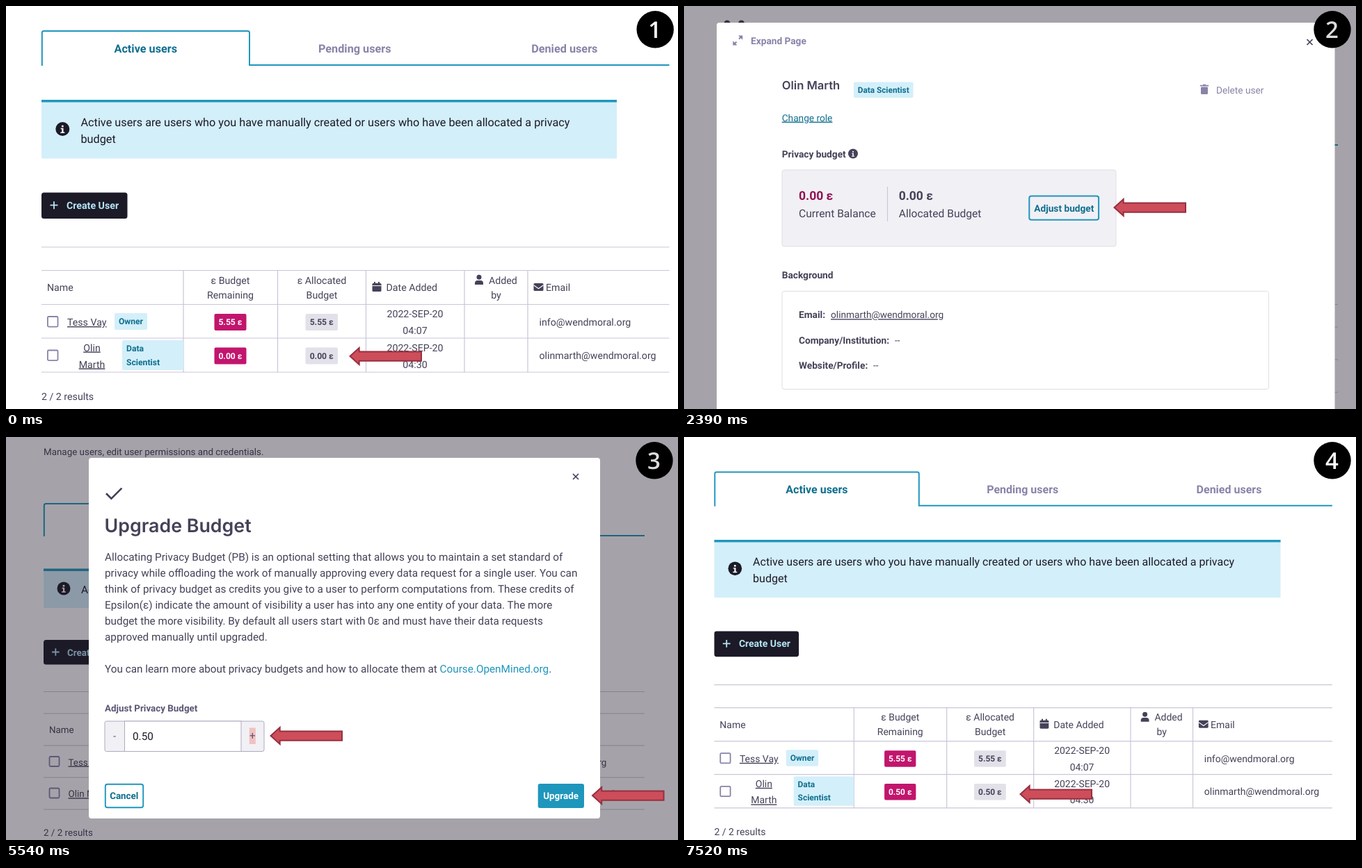
An HTML page for the animation above (8 s loop, 966x580 px).

```html
<!DOCTYPE html>
<html lang="en">
<head>
<meta charset="utf-8">
<title>Adjusting a privacy budget</title>
<style>
  html, body { margin: 0; width: 100%; height: 100%; overflow: hidden; background: #fff; }
  svg { display: block; width: 966px; height: 580px; }
  text { font-family: Roboto, sans-serif; text-rendering: geometricPrecision; white-space: pre; }
  .b { font-weight: 700; }
  .u { text-decoration: underline; }
  .title { font-family: Inter, sans-serif; font-weight: 600; }
  .num { font-family: "Open Sans", sans-serif; font-weight: 600; }
  .scene { opacity: 0; animation: 8s step-end infinite; }
  #list { animation-name: list; }
  #profile { animation-name: profile; }
  #upgrade { animation-name: upgrade; }
  #result { animation-name: result; }
  @keyframes list { 0% { opacity: 1 } 6.25%, 100% { opacity: 0 } }
  @keyframes profile { 0% { opacity: 0 } 6.25% { opacity: 1 } 45.625%, 100% { opacity: 0 } }
  @keyframes upgrade { 0% { opacity: 0 } 45.625% { opacity: 1 } 85%, 100% { opacity: 0 } }
  @keyframes result { 0% { opacity: 0 } 85%, 100% { opacity: 1 } }
</style>
</head>
<body>
<svg id="stage" viewBox="0 0 966 580">
  <g id="list" class="scene"></g>
  <g id="profile" class="scene"></g>
  <g id="upgrade" class="scene"></g>
  <g id="result" class="scene"></g>
</svg>
<script>
const INK = '#464158', DARK = '#1c1a27', MUTED = '#8883a8', LINE = '#c9c6d8',
      TEAL = '#1f96bc', DEEP = '#0f6f8e', PALE = '#d3effa', PINK = '#c2156d', GREY = '#e2e1e9';
const OWNER = 'Tess Vay', FIRST = 'Olin', LAST = 'Marth', USER = `${FIRST} ${LAST}`;
const OWNER_MAIL = 'info@wendmoral.org', USER_MAIL = 'olinmarth@wendmoral.org';
const NOTE = 'Active users are users who you have manually created or users who have been allocated a privacy';

const text = (x, y, str, size, fill = INK, cls = '', anchor = 'start') =>
  `<text x="${x}" y="${y}" font-size="${size}" fill="${fill}" class="${cls}" text-anchor="${anchor}">${str}</text>`;
const mid = (x, y, str, size, fill, cls) => text(x, y, str, size, fill, cls, 'middle');
const rect = (x, y, w, h, fill, r = 0, stroke = 'none', sw = 1) =>
  `<rect x="${x}" y="${y}" width="${w}" height="${h}" rx="${r}" fill="${fill}" stroke="${stroke}" stroke-width="${sw}"/>`;
const path = (d, stroke, sw = 1, fill = 'none') =>
  `<path d="${d}" fill="${fill}" stroke="${stroke}" stroke-width="${sw}"/>`;
const dot = (x, y, r, fill) => `<circle cx="${x}" cy="${y}" r="${r}" fill="${fill}"/>`;
const at = (x, y, k, body) => `<g transform="translate(${x} ${y}) scale(${k})">${body}</g>`;

const info = (x, y, r, ink = DARK) => at(x, y, r / 10,
  dot(0, 0, 10, ink) + dot(0, -4, 1.5, '#fff') +
  path('M-2.6 -1.2H1.2V4.6H3V6H-3V4.6H-1V.3H-2.6Z', 'none', 0, '#fff'));
const plus = (x, y, r, color) => path(`M${x - r} ${y}h${2 * r}M${x} ${y - r}v${2 * r}`, color, 1.8);
const cross = (x, y) => path(`M${x - 4} ${y - 4}l8 8m0 -8l-8 8`, INK, 1.7);
const check = (x, y, s) => rect(x, y, s, s, '#fff', 1.5, MUTED, 1.8);
const badge = (x, n, ink = '#fff') => dot(x, 33.8, 26.7, '#000') + mid(x - .5, 45.5, n, 33, ink, 'num');
const arrow = (x, y) => path(`M${x + 1} ${y}l13.2 -12v5.4h89.3v13.2h-89.3v5.4z`, '#96303f', 2, '#cd4d5b');
const chip = (x, y, w, h, fill, str, color) =>
  rect(x, y, w, h, fill, 2) + mid(x + w / 2, y + h / 2 + 4.2, str, 12.15, color, 'b');

const calendar = rect(526.5, 399, 13, 12, INK, 1.5) +
  path('M530 397v3M536 397v3', INK, 2) + path('M526.5 402.6h13', '#fff', 1);
const person = dot(680, 390.3, 3.5, INK) + path('M674 401v-2q0 -4 4 -4h4q4 0 4 4v2z', 'none', 0, INK);
const envelope = rect(758.5, 399, 14, 11, INK, 1.5) + path('M758.5 401.8l7 5l7 -5', '#fff', 1.1);

// User list; only the second user's budget differs between visits
function page(budget) {
  const S = 14.2, B = 16.25;
  const row = (y, amount) =>
    chip(299.5, y - 12, 46, 24, PINK, amount, '#fff') +
    chip(430.5, y - 12, 46.5, 24, GREY, amount, INK) +
    check(59.9, y - 8, 14.6) + mid(588, y - 7, '2022-SEP-20', S);
  return [
    path('M51.8 86V38.5Q51.8 36 54.3 36H347.5Q350 36 350 38.5V85H953.5', TEAL, 2),
    mid(200.8, 67, 'Active users', B, DEEP, 'b'),
    mid(501.3, 67, 'Pending users', B, MUTED, 'b'),
    mid(802.8, 67, 'Denied users', B, MUTED, 'b'),
    rect(51, 135, 827, 84.5, PALE), rect(51, 135, 827, 3.5, TEAL),
    info(81.3, 177, 10), text(107.5, 173, NOTE, B, DARK), text(107.5, 197, 'budget', B, DARK),
    rect(51, 268.5, 123.5, 37.5, DARK, 3.5), plus(69, 286.7, 5.5, '#b5e4f5'),
    text(87, 291.8, 'Create User', S, '#b5e4f5', 'b'),
    path('M51 347H953.5M51 380.5H953.5M51 429.5H953.5M51 478H953.5M51 527H953.5', LINE, 1.2),
    path([255, 390.5, 517.5, 659, 750].map(x => `M${x} 380.5V527`).join(''), LINE, 1.2),
    text(59, 410, 'Name', S),
    mid(322.5, 399.5, 'ε Budget', S), mid(322.5, 420.5, 'Remaining', S),
    mid(454, 399.5, 'ε Allocated', S), mid(454, 420.5, 'Budget', S),
    calendar, text(546.5, 410, 'Date Added', S),
    person, text(694, 399.5, 'Added', S), mid(704.5, 420.5, 'by', S),
    envelope, text(776, 410, 'Email', S),
    row(455, '5.55 ε'), mid(588, 472, '04:07', S),
    text(88, 460, OWNER, S, INK, 'u'), chip(156, 442, 47, 24, PALE, 'Owner', DEEP),
    text(766.5, 460, OWNER_MAIL, S),
    row(503.5, budget), mid(588, 520.5, '04:30', S),
    mid(123.5, 496.5, FIRST, S, INK, 'u'), mid(123.5, 520.5, LAST, S, INK, 'u'),
    rect(167, 481, 88, 43, PALE, 2),
    text(173, 497, 'Data', 12.15, DEEP, 'b'), text(173, 516.5, 'Scientist', 12.15, DEEP, 'b'),
    text(766.5, 508, USER_MAIL, S),
    text(51, 567, '2 / 2 results', S)
  ].join('');
}

const shade = rect(0, 0, 966, 580, 'rgba(30,27,40,.4)');

function profile() {
  const S = 13.7, B = 15.64;
  const field = (y, name, x, value, cls) =>
    text(165, y, name, S, INK, 'b') + text(x, y, value, S, INK, cls);
  return [
    rect(0, 0, 966, 580, '#fff'), dot(62, 25, 4.5, INK), dot(82.5, 25, 4.5, INK),
    path('M930 200h10', TEAL, 2), path('M930 429.5h10M930 462h10M930 509h10M930 556h10', LINE, 1.2),
    shade, rect(47, 24, 888.5, 570, '#fff', 4),
    path('M79 47.5l4 -4M75.5 51.5l-4 4', MUTED, 2),
    path('M78 42.5h6.2v6.2zM70.3 50.3v6.2h6.2z', 'none', 0, MUTED),
    text(96, 54.5, 'Expand Page', S, MUTED, 'b'), cross(899.5, 52),
    text(140.7, 119.7, USER, 16.6, INK, 'title'),
    rect(244, 109.5, 85.5, 22.5, PALE, 2), mid(286.7, 125, 'Data Scientist', 11.8, DEEP, 'b'),
    rect(743, 116.5, 10, 10.5, MUTED, 1.2), path('M741.8 114.7h12.4M746 113.6h4', MUTED, 1.8),
    text(765, 125.6, 'Delete user', S, MUTED),
    text(140.7, 165.6, 'Change role', S, DEEP, 'u'),
    text(140.7, 217.5, 'Privacy budget', S, INK, 'b'), info(243, 212.5, 7, INK),
    rect(141, 236, 480, 110, '#f1f0f5', 3, '#dfdee6'),
    text(165, 279.3, '0.00 ε', 17.5, '#910f51', 'b'), text(165, 303.5, 'Current Balance', B),
    path('M292.5 260v50', LINE, 1.1),
    text(308.7, 279.3, '0.00 ε', 17.5, INK, 'b'), text(308.7, 303.5, 'Allocated Budget', B),
    rect(496.3, 273.5, 99.8, 34.2, 'none', 3, TEAL, 2),
    mid(546.3, 295.5, 'Adjust budget', S, DEEP, 'b'),
    text(140.7, 392.3, 'Background', S, INK, 'b'),
    rect(141, 410.5, 699.5, 141, '#fff', 3, '#dfdee6'),
    field(449.3, 'Email:', 211, USER_MAIL, 'u'),
    field(485.6, 'Company/Institution:', 303, '--', ''),
    field(522, 'Website/Profile:', 272, '--', ''),
    badge(932, 2, '#dcdcdc'), arrow(617.5, 290.1)
  ].join('');
}

function upgrade() {
  const S = 13.4, B = 15.3;
  const lines = [
    'Allocating Privacy Budget (PB) is an optional setting that allows you to maintain a set standard of',
    'privacy while offloading the work of manually approving every data request for a single user. You can',
    'think of privacy budget as credits you give to a user to perform computations from. These credits of',
    'Epsilon(ε) indicate the amount of visibility a user has into any one entity of your data. The more',
    'budget the more visibility. By default all users start with 0ε and must have their data requests',
    'approved manually until upgraded.'
  ];
  return [
    rect(0, 0, 966, 580, '#fff'),
    text(54, 26, 'Manage users, edit user permissions and credentials.', S),
    path('M54.8 143V98.5Q54.8 96 57.3 96H338Q340 96 340 98.5V142H918', TEAL, 2),
    rect(54, 189.5, 791, 56.5, PALE), rect(54, 189.5, 791, 3.4, TEAL),
    info(83, 218, 9.5), text(108, 224.5, NOTE + ' budget', B, DARK),
    rect(54, 292, 118, 35.5, DARK, 3.5), plus(71.3, 309.5, 5.3, '#b5e4f5'),
    text(88, 314.5, 'Create User', S, '#b5e4f5', 'b'),
    path([366.5, 398, 444, 490, 536].map(y => `M54 ${y}H918`).join(''), LINE, 1.2),
    text(62, 425.5, 'Name', S), check(62.5, 460, 14), check(62.5, 505.5, 14),
    text(89.5, 472.5, OWNER, S, INK, 'u'), text(89.5, 518.3, USER, S, INK, 'u'),
    text(739, 472.5, OWNER_MAIL, S), text(739, 518.3, USER_MAIL, S),
    text(54, 573.7, '2 / 2 results', S),
    shade, rect(119, 30, 735, 519, '#fff', 4),
    cross(819, 57), path('M144 81.2l7.4 7.4l15 -15', INK, 2.7),
    text(141.5, 137, 'Upgrade Budget', 26.8, INK, 'title'),
    ...lines.map((s, i) => text(142, 178.4 + i * 22.95, s, B)),
    text(142, 339.2, `You can learn more about privacy budgets and how to allocate them at <tspan fill="${TEAL}">Course.OpenMined.org</tspan>.`, B),
    text(142, 395, 'Adjust Privacy Budget', S, '#5c5775', 'b'),
    rect(142, 409, 229, 43.5, '#f1f0f5', 2.5, '#aeabbf'),
    rect(170.5, 409, 167.5, 43.5, '#fff', 0, '#aeabbf'),
    mid(156, 435, '-', S), text(182, 436, '0.50', B, DARK),
    rect(349.8, 418.5, 9, 23.5, '#f1c1c2'), mid(354.3, 435.3, '+', B, '#5c5775'),
    rect(142.8, 499.8, 54.4, 33.4, '#fff', 3, TEAL, 1.9), mid(169.8, 521, 'Cancel', S, DEEP, 'b'),
    rect(764.7, 499, 66.3, 35, TEAL, 3), mid(797.6, 521, 'Upgrade', S, '#fff', 'b'),
    badge(932, 3, '#dcdcdc'), arrow(379.5, 430.1), arrow(842, 516.1)
  ].join('');
}

const fill = (id, body) => { document.getElementById(id).innerHTML = body; };
fill('list', page('0.00 ε') + badge(933.2, 1) + arrow(493.5, 504.1));
fill('profile', profile());
fill('upgrade', upgrade());
fill('result', at(-6.7, 15.1, .9843, page('0.50 ε')) + badge(932, 4) + arrow(482.5, 514.1));
</script>
</body>
</html>
```
